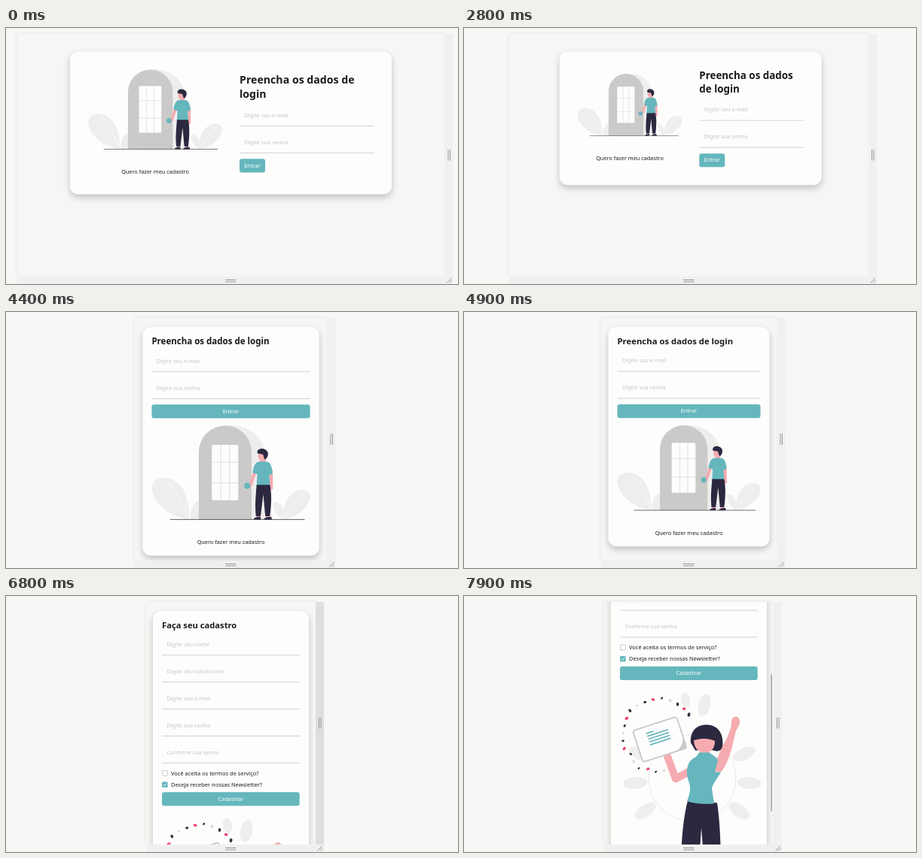
An HTML page for the animation above (8 s loop, 600x341 px).

```html
<!DOCTYPE html>
<html lang="pt-BR">
<head>
<meta charset="utf-8">
<title>Login responsivo</title>
<style>
  html, body { margin: 0; height: 100%; overflow: hidden; background: #f6f8f6; }
  svg { display: block; }
  text { font: 7.4px "Noto Sans", "Open Sans", sans-serif; fill: #1c1c1e; }
  .title { font-weight: 700; fill: #1b1b1f; }
  .hint { fill: #c6c6c5; }
  .mid { text-anchor: middle; }
  .on { fill: #fff; }
  .card { fill: #fdfdfc; filter: drop-shadow(0 4px 4px rgba(0, 0, 0, .22)); }
  .page { fill: #f6f6f4; filter: drop-shadow(0 0 2px rgba(0, 0, 0, .09)); }
  .teal { fill: #65b7bd; }
  .dark { fill: #2b2840; }
  .skin { fill: #f5abb0; }
  .pale { fill: #eeeeed; }
  .grey { fill: #cbcac9; }
  .limb { fill: none; stroke: #f5abb0; stroke-linecap: round; stroke-linejoin: round; }
  .vein { fill: none; stroke: #fdfdfc; stroke-width: .9; }
  .grip { fill: none; stroke: #969796; }
</style>
</head>
<body>
<svg width="600" height="341" viewBox="0 0 600 341">
  <defs>
    <!-- 237 x 141 -->
    <g id="door">
      <path class="pale" d="M56 141C34 138 2 122 0 92C2 78 21 73 37 85C51 95 57 118 56 141Z
        M58 141C57 128 60 116 72 112V141Z
        M198 141C194 122 202 104 218 97C230 93 238 99 237 109C234 124 216 138 198 141Z
        M197 141C187 137 180 124 183 114C192 113 200 126 197 141Z"/>
      <path class="vein" d="M56 141Q45 108 23 83M198 141Q208 117 229 100"/>
      <path class="pale" d="M92 141V39.5A39.5 39.5 0 0 1 110 0A52 46 0 0 1 170 46V141Z"/>
      <path class="grey" d="M70.5 141V39.5a39.5 39.5 0 0 1 79 0V141Z"/>
      <rect x="90" y="29" width="39.5" height="83" rx="2" fill="#fdfdfc"/>
      <path stroke="#d3d2d1" stroke-width=".8" d="M103.5 29v83m13-83v83M90 55h39.5M90 86h39.5"/>
      <path stroke="#4c4c50" d="M27.5 141H229"/>
      <path class="limb" stroke-width="5" d="M155 68L151 80L147 91M178.5 68L179 94"/>
      <circle class="teal" cx="143" cy="90.5" r="4.6"/>
      <path class="skin" d="M162 47h8l1 9h-9ZM157 134h5v5h-5Zm14 0h5v5h-5Z"/>
      <ellipse class="skin" cx="164" cy="46" rx="5" ry="6"/>
      <path class="dark" d="M158.5 42C156 35 165 33 170 36C176 39 175 47 170 51C168 51 168 45 166 43Z"/>
      <path class="teal" d="M151 71C153 60 155 54 162 54H171C178 54 180 62 181 72L176 74L177 90H157L158 73Z"/>
      <path class="dark" d="M157 89H177C180 104 179 120 177 136H170L167 103L163 136H156C154 120 156 104 157 89Z
        M153 141C153 138 158 137 163 137V141ZM168 141C169 138 173 137 179 137L180 141Z"/>
    </g>
    <!-- page coordinates -->
    <g id="party">
      <circle cx="303" cy="410" r="58" fill="none" stroke="#e9e9e8"/>
      <g id="leaves" class="pale"></g>
      <g id="confetti"></g>
      <path class="limb" stroke-width="10" d="M270 381L281 411L305 398"/>
      <g transform="translate(224 347) rotate(-18)">
        <rect width="61" height="44" rx="3" fill="#fdfdfc" stroke="#c9c8c7" stroke-width="1.8"/>
        <path class="grey" d="M61 44H44Q57 42 61 28Z"/>
        <path stroke="#65b7bd" stroke-width="1.7" d="M16 9h10m-10 4h29m-29 4h29m-29 4h29m-29 4h29"/>
      </g>
      <path class="dark" d="M301 363C300 347 309 339 322 339C337 339 346 351 343 371Q337 376 331 373H307Z"/>
      <path class="skin" d="M305 357H333C334 367 330 374 326 374V381H313V374C308 372 305 367 305 357Z"/>
      <path class="dark" d="M301 361C302 348 313 346 321 347C331 347 337 354 334 361Q320 354 301 361Z"/>
      <path class="skin" d="M355 334C356 327 365 326 366 333C367 338 364 341 361 347L355 372C351 385 347 396 341 402L331 401C334 388 339 376 344 366C350 356 353 347 355 340Z"/>
      <path class="dark" d="M297 440L336 443C340 470 341 500 341 540H320L315 476L311 540H288C288 500 290 467 297 440Z"/>
      <path class="teal" d="M312 376H326C330 380 336 382 337 386L333 402H341C336 411 330 418 329 424L332 444Q313 446 296 441C300 430 302 424 298 414C294 402 296 389 304 384Q310 381 312 376Z"/>
    </g>
    <clipPath id="clip"><rect id="clipBox" y="8" height="323"/></clipPath>
  </defs>
  <g id="stage"></g>
</svg>
<script>
const $ = id => document.getElementById(id);
const MID = 298.5, TOP = 8, BOTTOM = 331, FULL = 568, SCROLL = 167.5;

// time, half width of the page
const drag = [[2300, FULL / 2], [2800, 238.5], [3200, 192], [3400, 182], [4400, 128], [5100, 112.5]];

function halfWidth(t) {
  const i = drag.findIndex(([time]) => t < time);
  if (i < 1) return i ? drag.at(-1)[1] : drag[0][1];
  const [a, u] = drag[i - 1], [b, v] = drag[i];
  return u + (v - u) * (t - a) / (b - a);
}

const text = (x, y, s, cls = '', size = 7.4) =>
  `<text x="${x}" y="${y}" class="${cls}" style="font-size:${size}px">${s}</text>`;
const rect = (x, y, w, h, r = 0, attr = '') =>
  `<rect x="${x}" y="${y}" width="${w}" height="${h}" rx="${r}" ${attr}/>`;
const line = (d, attr) => `<path d="${d}" ${attr}/>`;
const ellipse = (x, y, a, b, turn) =>
  `<ellipse rx="${a}" ry="${b}" transform="translate(${x} ${y}) rotate(${turn})"/>`;

const field = (x, y, w, label) => text(x + 6.4, y - 11.8, label, 'hint') +
  line(`M${x} ${y}h${w}`, 'stroke="#d0d1d0"');
const button = (x, y, w, label) => rect(x, y, w, 18.2, 3, 'class="teal"') +
  text(x + w / 2, y + 11.3, label, 'mid on');

function login(W) {
  const wide = W > 380, pad = wide ? 24 : 12, top = wide ? 31.5 : 20;
  const mid = MID + (wide ? (FULL - W) / 40 : 0);
  const cardW = wide ? .868 * W - 66 : Math.min(261, .915 * W);
  const x = mid - cardW / 2 + pad, inner = cardW - 2 * pad;
  const colW = wide ? (inner - 23) / 2 : inner;
  const size = 9.37 + .00845 * W, lead = 1.33 * size;
  const rows = !wide ? ['Preencha os dados de login']
    : W > 520 ? ['Preencha os dados de', 'login'] : ['Preencha os dados', 'de login'];
  const formH = rows.length * lead + 94, artH = colW * .595;
  const bodyH = wide ? Math.max(formH, artH + 36) : formH + 10 + artH + 36;
  const fx = wide ? x + colW + 23 : x;
  const fy = top + pad + (wide ? (bodyH - formH) / 2 : 0);
  const ay = wide ? top + pad + (bodyH - artH - 36) / 2 : fy + formH + 10;
  const y = fy + rows.length * lead + 32;
  return rect(mid - cardW / 2, top, cardW, bodyH + 2 * pad, 11, 'class="card"') +
    rows.map((s, i) => text(fx, fy + lead * (i + .5) + .3 * size, s, 'title', size)).join('') +
    field(fx, y, colW, 'Digite seu e-mail') + field(fx, y + 36, colW, 'Digite sua senha') +
    button(fx, y + 44, wide ? 34 : colW, 'Entrar') +
    `<use href="#door" transform="translate(${x} ${ay}) scale(${colW / 237})"/>` +
    text(x + colW / 2, ay + artH + 32.4, 'Quero fazer meu cadastro', 'mid', 7.32);
}

function signup() {
  const x = 207, w = 182.7;
  const labels = ['Digite seu nome', 'Digite seu sobrenome', 'Digite seu e-mail',
    'Digite sua senha', 'Confirme sua senha'];
  return rect(195, 20, 207, 545, 11, 'class="card"') +
    text(x, 42.8, 'Faça seu cadastro', 'title', 11.2) +
    labels.map((s, i) => field(x, 78.8 + 35.9 * i, w, s)).join('') +
    rect(207.4, 232.4, 7, 7, 1.5, 'fill="#fff" stroke="#bbb" stroke-width=".8"') +
    rect(207, 247.4, 7.7, 7.7, 1.5, 'class="teal"') +
    line('M208.8 251.2l1.5 1.6l2.8-3', 'fill="none" stroke="#fff"') +
    text(219, 238.6, 'Você aceita os termos de serviço?', '', 7.45) +
    text(219, 253.6, 'Deseja receber nossas Newsletter?', '', 7.45) +
    button(x, 261.3, w, 'Cadastrar') + '<use href="#party"/>';
}

function scene(t) {
  const half = halfWidth(t), W = 2 * half, L = MID - half, R = MID + half;
  const hot = t >= 1800 && t < 2000 || t >= 6800 && t < 7100;
  const scroll = SCROLL * Math.max(0, (t - 7300) / 600) ** 1.2;
  $('clipBox').setAttribute('x', L);
  $('clipBox').setAttribute('width', W);
  return rect(L, TOP, W, BOTTOM - TOP, 0, 'class="page"') +
    rect(R, TOP, 11, BOTTOM - TOP, 0, `fill="${hot ? '#dddfde' : '#eff1f0'}"`) +
    rect(L, BOTTOM, W + 11, 10, 0, 'fill="#eff1f0"') +
    line(`M${R + 4.5} 162v14.5m2.5-14.5v14.5M291 335.5h14.5m-14.5 2.5h14.5` +
      `M${R + 2.5} 339.5l6.5-6.5m-3 6.5l3.5-3.5`, 'class="grip"') +
    `<g clip-path="url(#clip)"><g transform="translate(0 ${-scroll})">` +
    (t < 6200 ? login(W) : signup()) + '</g>' +
    (scroll ? rect(407.4, TOP + 1 + scroll * .567, 1.6, 183, .8, 'fill="#a3a4a3"') : '') + '</g>';
}

let seed = 7;
const random = () => (seed = seed * 16807 % 2147483647) / 2147483647;
const repeat = (n, draw) => Array.from({ length: n }, (_, i) => draw(i)).join('');

// three leaves on each side of the ring, two above it
$('leaves').innerHTML = repeat(6, i => {
  const side = i % 2 ? 1 : -1, a = (i >> 1) * 30 - 25, rad = a * Math.PI / 180;
  return ellipse(303 + side * 76 * Math.cos(rad), 410 + 76 * Math.sin(rad), 16, 8, side * a);
}) + repeat(2, i => ellipse(319 - 25 * i, 313 - 7 * i, 8 - 2 * i, 15 - 5 * i, 12 - 22 * i));

// confetti on an arc around the raised sheet
const tints = ['#2f2e3a', '#ee4672', '#2f2e3a', '#d5d5d5'];
$('confetti').innerHTML = repeat(20, i => {
  const a = -.7 - i * .215, r = 1 + (random() - .5) * .16;
  const size = 1.5 + 1.3 * random();
  return `<g fill="${tints[i % 4]}">` +
    ellipse(262 + 52 * r * Math.cos(a), 354 + 48 * r * Math.sin(a), size, size * .7, 360 * random()) + '</g>';
});

let shown = -1;
function frame(now) {
  const t = Math.floor(now % 8000 / 100) * 100;
  if (t !== shown) $('stage').innerHTML = scene(shown = t);
  requestAnimationFrame(frame);
}
frame(performance.now());
</script>
</body>
</html>
```
